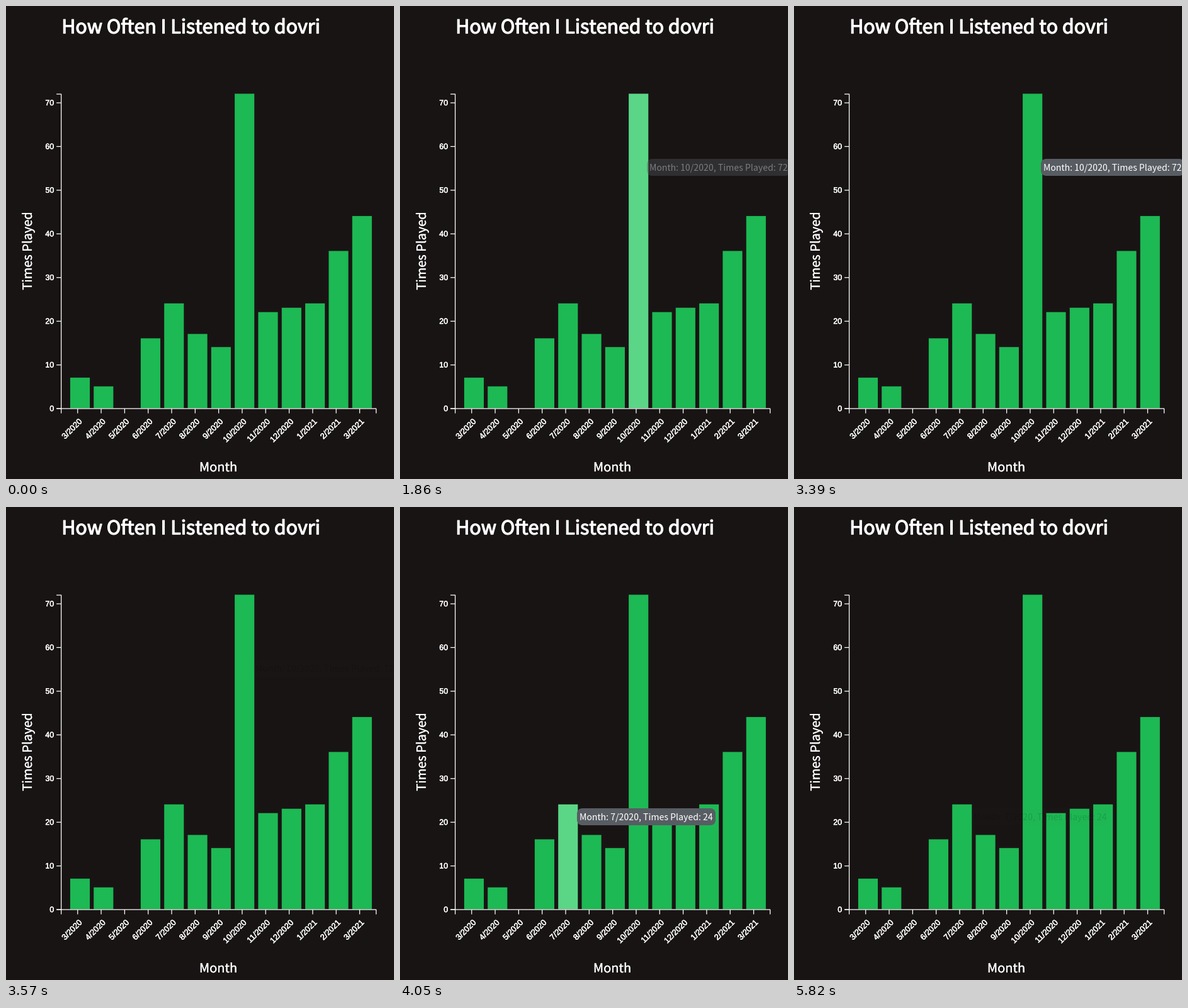
Recreate the animation shown at these times as a matplotlib script. Size 616x752 px, loop 7020 ms.

```python
import matplotlib.pyplot as plt
from matplotlib import patheffects
from matplotlib.animation import FuncAnimation
from matplotlib.patches import FancyBboxPatch, Rectangle

WIDTH, HEIGHT, DPI = 616, 752, 64
STEP_MS, LOOP_MS = 30, 7020
BACKGROUND, GREEN, LIGHT_GREEN, SLATE = "#191414", "#1db954", "#5bd687", "#585d63"
PLAYS = [7, 5, 0, 16, 24, 17, 14, 72, 22, 23, 24, 36, 44]
MONTHS = [f"{(i + 2) % 12 + 1}/{2020 + (i + 2) // 12}" for i in range(13)]

LEFT, TOP, SIZE = 87, 139.45, 500
AXIS_X, AXIS_Y = LEFT + 0.625, TOP + SIZE + 0.625
TICK = 7.5
BAND = SIZE / 13.4
UNIT = SIZE / max(PLAYS)


def points(px):
    return px * 72 / DPI


fig = plt.figure(figsize=(WIDTH / DPI, HEIGHT / DPI), dpi=DPI, facecolor=BACKGROUND)
ax = fig.add_axes([0, 0, 1, 1])
ax.set_xlim(0, WIDTH)
ax.set_ylim(HEIGHT, 0)
ax.axis("off")


def label(x, y, text, px, font="Noto Sans CJK JP", weight=0, **style):
    """Writes text on its baseline; weight thickens the strokes, in pixels."""
    style = {"color": "white", "va": "baseline", "rotation_mode": "anchor", **style}
    item = ax.text(x, y, text, fontsize=points(px), fontfamily=font, **style)
    if weight:
        item.set_path_effects([
            patheffects.withStroke(linewidth=points(weight), foreground="white")])
    return item


def tick_label(x, y, text, px, **style):
    label(x, y, text, px, "Liberation Sans", weight=0.45, ha="right", **style)


def line(xs, ys):
    ax.plot(xs, ys, color="white", lw=points(1.25), snap=False,
            solid_capstyle="butt", solid_joinstyle="miter", zorder=3)


def draw_axes():
    end_x, top_y = AXIS_X + SIZE, AXIS_Y - SIZE
    line([AXIS_X - TICK, AXIS_X, AXIS_X, AXIS_X - TICK], [AXIS_Y, AXIS_Y, top_y, top_y])
    line([AXIS_X, AXIS_X, end_x, end_x], [AXIS_Y + TICK, AXIS_Y, AXIS_Y, AXIS_Y + TICK])
    for value in range(0, 71, 10):
        y = AXIS_Y - value * UNIT
        line([AXIS_X - TICK, AXIS_X], [y, y])
        tick_label(76.3, y + 4, str(value), 12.5)
    for i, month in enumerate(MONTHS):
        x = AXIS_X + BAND * (i + 0.7)
        line([x, x], [AXIS_Y, AXIS_Y + TICK])
        tick_label(x + 8, AXIS_Y + 21, month, 12.9, rotation=45)


def draw_bar(i):
    height = PLAYS[i] * UNIT
    bar = Rectangle((LEFT + BAND * (i + 0.4), TOP + SIZE - height), 31.14, height,
                    fc=GREEN, lw=0, snap=False, zorder=2)
    return ax.add_patch(bar)


class Hover:
    """Highlights one bar and fades its tooltip in and out."""

    def __init__(self, index, x, y, width, enter, leave, clear):
        self.bar = bars[index]
        self.enter, self.leave, self.clear = enter, leave, clear
        self.box = ax.add_patch(FancyBboxPatch(
            (x, y), width, 27, boxstyle="round,pad=0,rounding_size=9",
            fc=SLATE, lw=0, zorder=4))
        text = f"Month: {MONTHS[index]}, Times Played: {PLAYS[index]}"
        self.text = label(x + 3.6, y + 19, text, 14.1, zorder=5)

    def opacity(self, ms):
        if ms < self.leave:
            return ease((ms - self.enter - 30) / 200)
        return 1 - ease((ms - self.leave) / 180)

    def update(self, ms):
        self.bar.set_facecolor(LIGHT_GREEN if self.enter <= ms < self.leave else GREEN)
        alpha = self.opacity(ms)
        faint = self.leave + 180 <= ms < self.clear
        self.box.set_alpha(0.02 if faint else alpha)
        self.text.set_color("black" if faint else "white")
        self.text.set_alpha(0.12 if faint else alpha)


def ease(t):
    t = min(max(t, 0), 1)
    return 4 * t ** 3 if t < 0.5 else 1 - 4 * (1 - t) ** 3


label(88.3, 43.5, "How Often I Listened to dovri", 30.3, weight=1.2)
label(337, 740, "Month", 20, weight=0.2, ha="center")
label(41, 389.5, "Times Played", 20, weight=0.2, ha="center", rotation=90)
draw_axes()
bars = [draw_bar(i) for i in range(len(PLAYS))]
hovers = [
    Hover(7, 392, 243, 228, enter=1740, leave=3390, clear=3810),
    Hover(4, 281, 479, 220, enter=3810, leave=5640, clear=LOOP_MS),
]


def update(frame):
    for hover in hovers:
        hover.update(frame * STEP_MS)
    return []


animation = FuncAnimation(fig, update, frames=LOOP_MS // STEP_MS, interval=STEP_MS,
                          repeat=True, repeat_delay=0)
plt.show()
```
